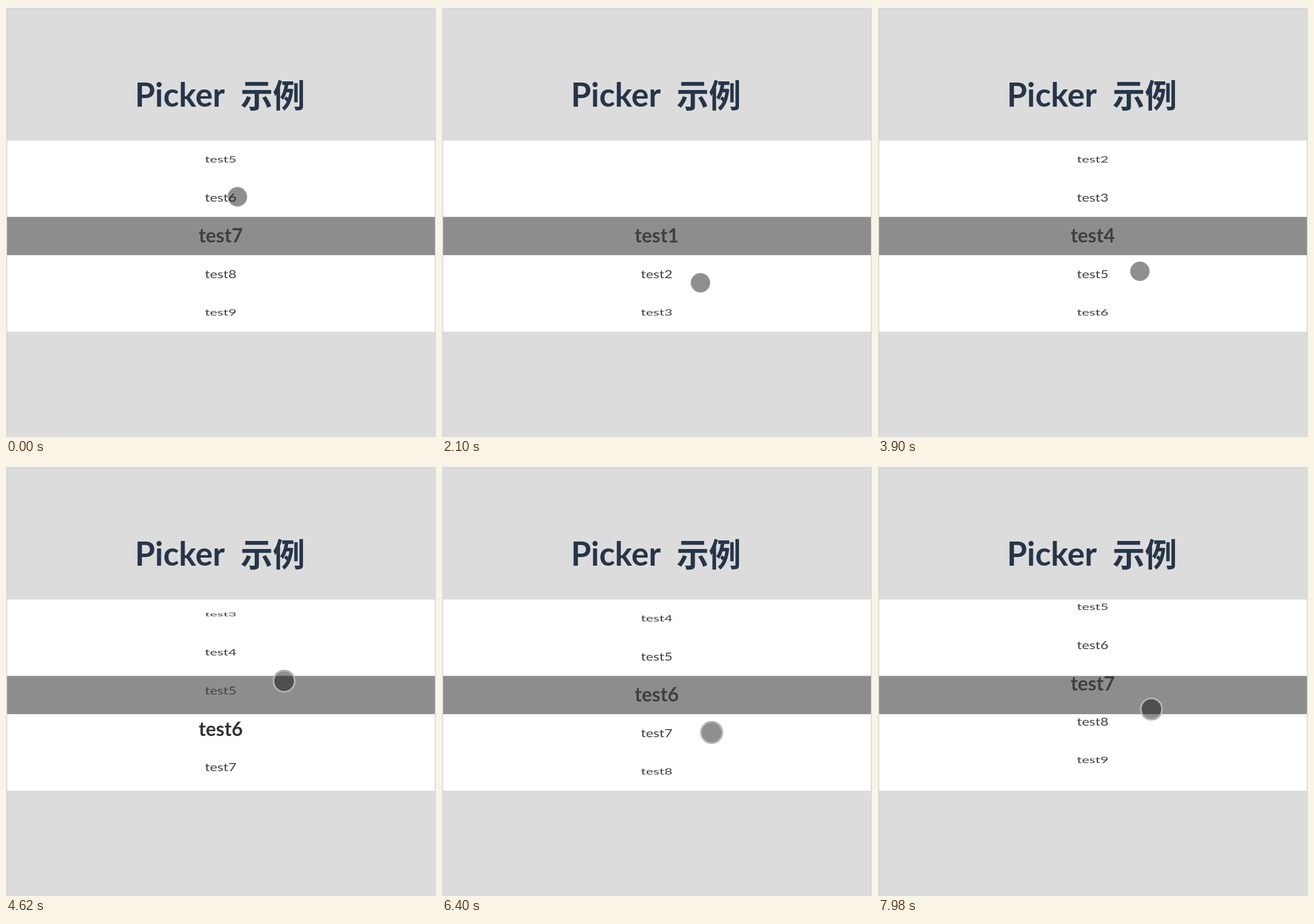
These frames come from a looping animation (747x749 px, 8000 ms). An HTML page:

```html
<!DOCTYPE html>
<html lang="zh">
<head>
<meta charset="utf-8">
<style>
  html, body { margin: 0; height: 100%; overflow: hidden; background: #f1f1f1; }
  svg { display: block; }
  text { font-family: Lato, "Open Sans", sans-serif; }
  .title { font-weight: 700; fill: #263549; }
  .cjk { font-family: "Noto Sans CJK SC", "Noto Sans CJK", sans-serif; }
  #rows text { fill: #404040; text-anchor: middle; font-size: 24.4px; }
  #rows text.on { fill: #333; font-size: 33.4px; font-weight: 700; }
</style>
</head>
<body>
<svg width="100%" height="100%" viewBox="0 0 747 749">
  <rect x="1.5" y="4.5" width="744" height="760" fill="#dcdcdc" stroke="#c9c9c9"/>
  <text class="title" x="224" y="174.5" font-size="56.4">Picker</text>
  <text class="title cjk" x="407.5" y="176" font-size="56">示例</text>
  <svg x="2" y="233.5" width="743" height="332.5">
    <rect width="743" height="332.5" fill="#fff"/>
    <g id="rows"></g>
    <rect y="133" width="743" height="66.5" fill="rgba(72,72,72,.62)"/>
  </svg>
  <circle id="touch" fill="rgba(0,0,0,.44)" stroke="#b4b4b4"/>
</svg>
<script>
const LOOP = 8000, ROW = 66.5, RESET = 550, APPEAR = 700;

const slides = [
  { from: 2220, to: 3020, by: 3 },
  { from: 4180, to: 4980, by: 2 },
  { from: 6600, to: 7760, by: 1 },
  { from: 7760, to: 7980, by: .29 },
];

// A press lasts until the next glide begins, unless that one presses too.
const glides = [
  { from: 700, to: 840, x: 463, y: 326 },
  { from: 1380, to: 1660, x: 449, y: 481 },
  { from: 2220, to: 2700, x: 476, y: 382, down: true },
  { from: 2920, to: 3480, x: 454, y: 477 },
  { from: 3620, to: 3900, x: 455, y: 461 },
  { from: 4180, to: 4700, x: 485, y: 370, down: true },
  { from: 4880, to: 5280, x: 468, y: 469 },
  { from: 6200, to: 7000, x: 471, y: 442, down: true },
  { from: 7520, to: 7980, x: 475, y: 424, down: true },
];

const progress = (t, { from, to }) => Math.min(1, Math.max(0, (t - from) / (to - from)));
const smooth = f => f * f * (3 - 2 * f);

function listAt(t) {
  if (t < RESET) return { pos: 7, pick: 7 };
  let pos = 1, pick = 1;
  for (const s of slides) {
    const f = progress(t, s);
    pos += f * s.by;
    if (f > .3) pick += Math.round(s.by);
  }
  return { pos, pick };
}

function touchAt(t) {
  if (t < APPEAR) return { x: 402, y: 331.5, hidden: t >= RESET };
  let x = 460, y = 437, down = false;
  for (const g of glides.filter(g => t >= g.from)) {
    const f = smooth(progress(t, g));
    x += (g.x - x) * f;
    y += (g.y - y) * f;
    down = g.down;
  }
  return { x, y, down };
}

function set(el, attrs) {
  for (const name in attrs) el.setAttribute(name, attrs[name]);
}

const rowBox = document.getElementById("rows");
const touch = document.getElementById("touch");
const rows = Array.from({ length: 9 }, (_, i) => {
  const row = document.createElementNS("http://www.w3.org/2000/svg", "text");
  row.textContent = "test" + (i + 1);
  set(row, { dy: ".35em" });
  return rowBox.appendChild(row);
});

function draw(now) {
  const t = now % LOOP;
  const { pos, pick } = listAt(t);
  rows.forEach((row, i) => {
    const n = i + 1;
    const y = (n - pos + 2.5) * ROW - .3;
    const flat = Math.max(0, 1 - .2 * Math.abs(n - pick));
    set(row, {
      transform: `translate(371 ${y}) scale(1 ${flat})`,
      class: n === pick ? "on" : "",
    });
  });

  const { x, y, down, hidden } = touchAt(t);
  set(touch, {
    cx: x, cy: y,
    r: down ? 18.5 : 16.7,
    "stroke-width": down ? 3 : 1,
    visibility: hidden ? "hidden" : "visible",
  });
  requestAnimationFrame(() => draw(performance.now()));
}
draw(0);
</script>
</body>
</html>
```
